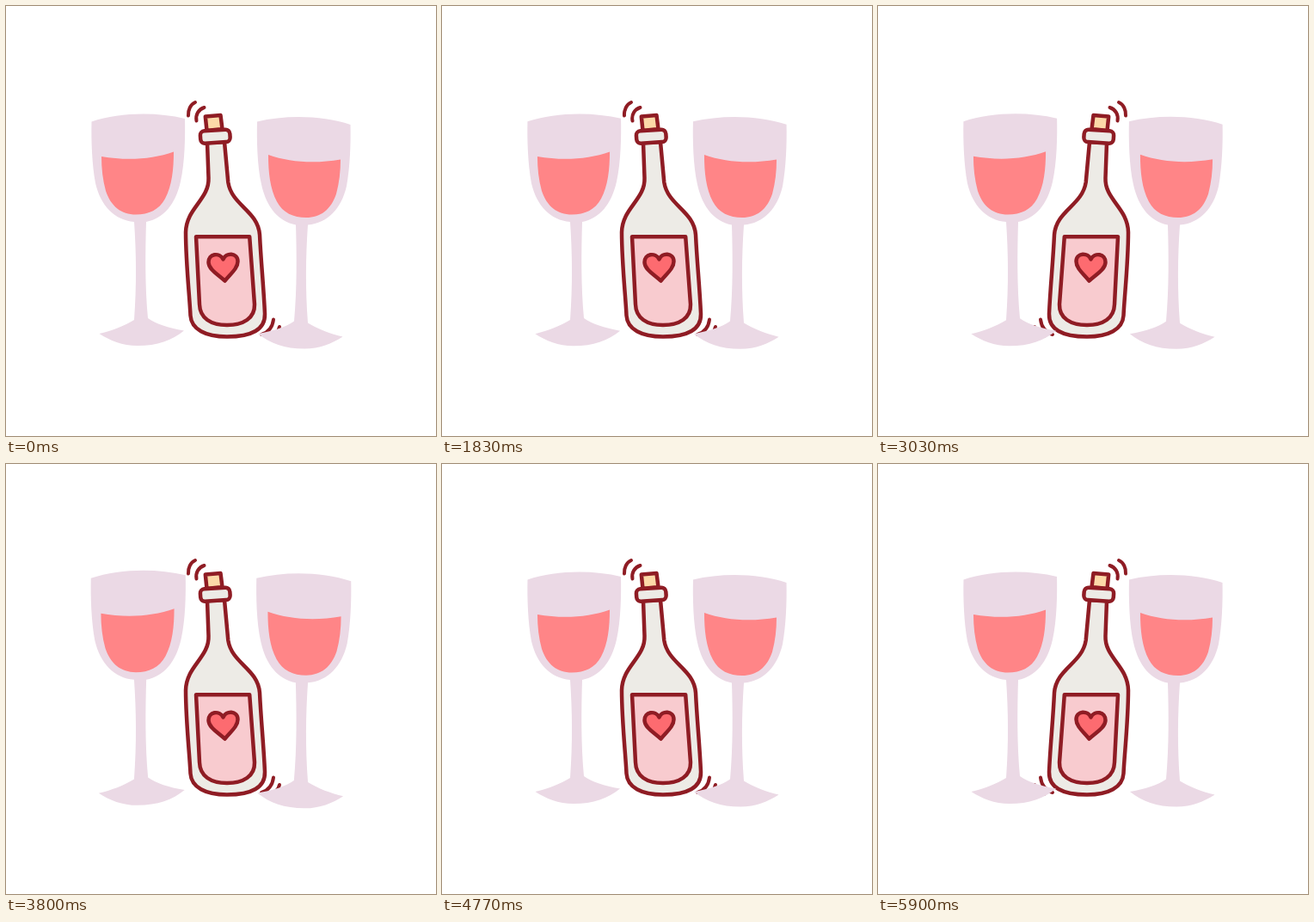
Recreate the animation shown at these times as an HTML page. Size 500x500 px, loop 5930 ms.

```html
<!DOCTYPE html>
<html lang="en">
<head>
<meta charset="utf-8">
<title>Wine and two glasses</title>
<style>
  html, body { margin: 0; width: 100%; height: 100%; overflow: hidden; background: #fff; }
  svg { display: block; width: 100vw; height: 100vh; }
  .ink { stroke: #8f1c24; stroke-width: 4.500; stroke-linejoin: round; stroke-linecap: round; fill: none; }
  .mark { stroke-width: 4; }
</style>
</head>
<body>
<svg viewBox="0 0 500 500">
  <defs>
    <g id="glass">
      <path fill="#ebd9e5" d="M99.5 134.5 C132 123.5 175 123 208 131 C208.5 152 208 182 203 204
        C197 231 183 247 163 251 C162 285 161.5 325 165 363 C175 370 188 374 207 377.5
        C193 389 176 395 153 395 C135 395 121 389 108.5 381 C122 378 138 372 149 365
        C152 325 151.5 287 149 251 C126 249 110 232 104 206 C100 184 99 157 99.5 134.5 Z"/>
      <path fill="#ff8587" d="M111 175 C140 180 170 178.5 195 169.5 C195 190 193 209 185 224
        C178 237 166 242.5 151 242.5 C134 242.5 122 233 116 215 C112.5 202 111 189 111 175 Z"/>
    </g>
  </defs>

  <g id="bottle" class="ink">
    <path class="mark" d="M212 127.5 C211.5 121 214.5 114.5 220 112 M221.5 133.5 C220 126.5 224 120 230.5 118"/>
    <path class="mark" d="M297 382 C305 379.5 310 373 311 364.5 M307 384 C313 382 317 378 318 373"/>
    <path fill="#fcd9a8" d="M231.8 128.5 L249.500 127 L251.5 143 L233.5 145 Z"/>
    <path fill="#edebe6" d="M234 159 L235.5 200 C236.5 225 209.5 235 209 263 C209 298 213.5 338 214.5 360
      C215.5 376 232 384.5 257 384.5 C286 384.5 301.5 376 301 358 C299.5 325 296.5 298 295 266
      C293 238 262.5 232 258.3 205 L254 158 Z"/>
    <rect fill="#edebe6" x="226" y="144.5" width="34.5" height="14.5" rx="5" transform="rotate(-4 243 151.5)"/>
    <path fill="#f8cbcf" d="M221 268.2 L283.2 268.2 L289 347 C289.5 363 276 371 257 371
      C238 371 225.5 363 225 347 Z"/>
    <path fill="#fd6b70" d="M254.5 319.5 C246 312 235.5 306 235.5 298 C235.500 288 248 286 252.5 294.5
      C255.5 286.5 269.5 286.5 269.5 297 C269.5 305 261.5 311 254.5 319.5 Z"/>
  </g>

  <use id="left" href="#glass"/>
  <use id="right" href="#glass"/>
</svg>
<script>
  const LOOP = 5930;
  const PULSE = LOOP / 10;
  const SWAP = 380;
  const GROWTH = 0.015;
  const MIRROR = "translate(500 0) scale(-1 1)";
  const part = id => document.getElementById(id);
  const bottle = part("bottle"), left = part("left"), right = part("right");

  function draw(t) {
    // The bottle rocks in hard steps; the glasses swell and shrink.
    const flipped = Math.floor(t / SWAP) % 2 === 1;
    bottle.setAttribute("transform", flipped ? MIRROR : "");

    const swell = 1 + GROWTH * (1 - Math.cos(2 * Math.PI * t / PULSE)) / 2;
    const pulse = `translate(153.5 260.5) scale(${swell}) translate(-153.5 -260.5)`;
    left.setAttribute("transform", pulse);
    right.setAttribute("transform", `translate(0 3.5) ${MIRROR} ${pulse}`);
  }

  const start = performance.now();
  function tick() {
    draw((performance.now() - start) % LOOP);
    requestAnimationFrame(tick);
  }
  draw(0);
  requestAnimationFrame(tick);
</script>
</body>
</html>
```
